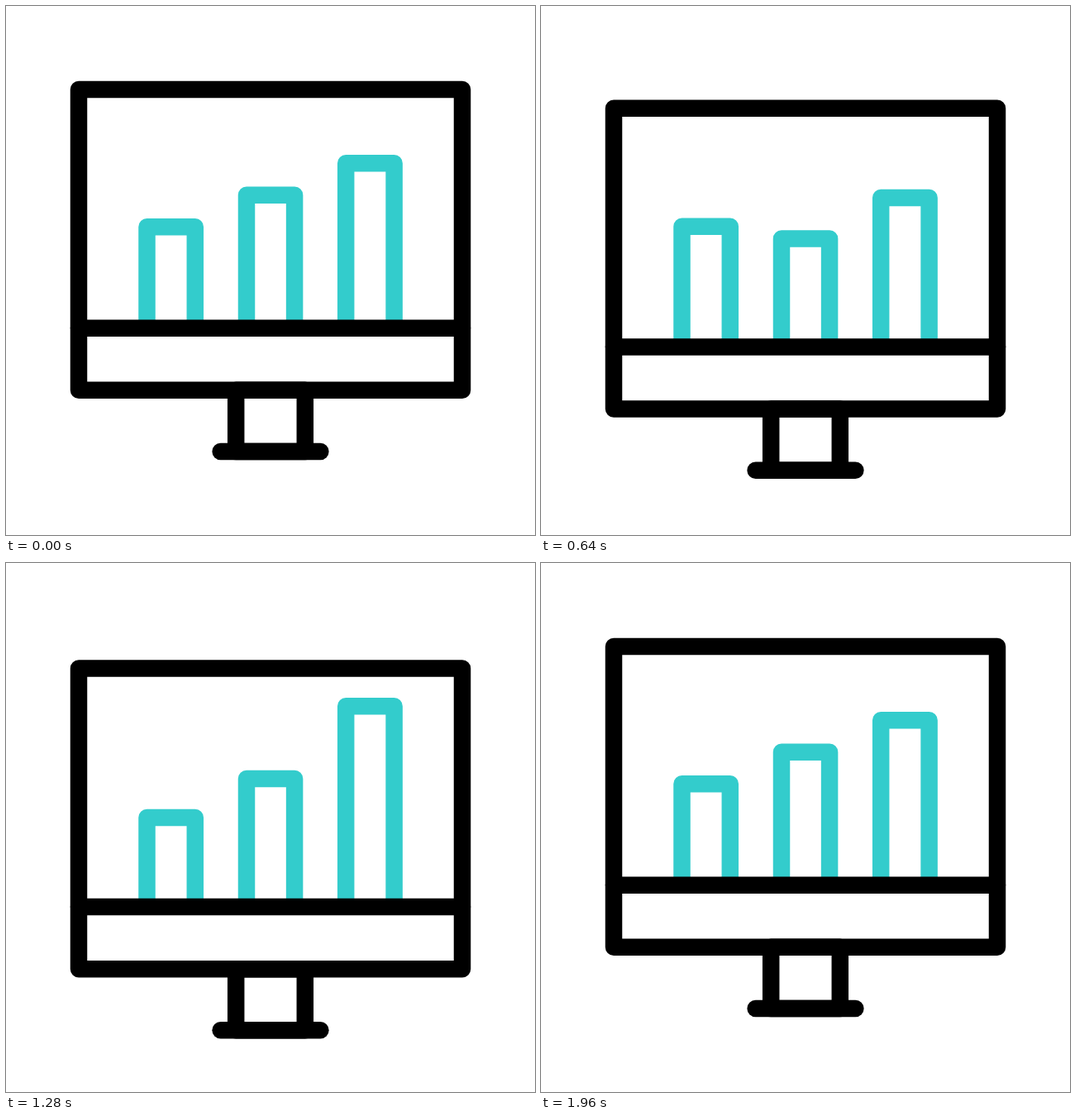
Recreate the animation shown at these times as an HTML page with a canvas. Size 640 by 640 pixels, loop 2000 ms.

```html
<!DOCTYPE html>
<html lang="en">
<head>
<meta charset="utf-8">
<title>Bar chart on a monitor</title>
<style>
  html, body { margin: 0; width: 100%; height: 100%; overflow: hidden; background: #fff; }
  canvas { display: block; width: 640px; height: 640px; }
</style>
</head>
<body>
<canvas id="stage" width="640" height="640"></canvas>
<script>
const ctx = document.getElementById('stage').getContext('2d');
const LOOP = 2000, STEP = 40, STAGGER = 200;
const BAND_Y = 389.7;

// [time in ms, vertical offset]
const bob = [[40, 0], [1000, 31], [1960, 0]];
const bounce = [[40, 0], [400, 31], [800, -47.4], [1200, 16], [1520, 0]];

// [left, right, resting top], measured along the centre of the stroke
const bars = [[170.5, 228.8, 267.3], [291, 349.1, 228.8], [411.2, 469.6, 190.3]];

// cubic-bezier(.5, 0, .5, 1)
function ease(x) {
  let lo = 0, hi = 1;
  for (let i = 0; i < 30; i++) {
    const u = (lo + hi) / 2, v = 1 - u;
    if (1.5 * u * v * v + 1.5 * u * u * v + u * u * u < x) lo = u;
    else hi = u;
  }
  return lo * lo * (3 - 2 * lo);
}

function valueAt(keys, t) {
  if (t <= keys[0][0]) return keys[0][1];
  for (let i = 1; i < keys.length; i++) {
    const [t0, v0] = keys[i - 1], [t1, v1] = keys[i];
    if (t < t1) return v0 + (v1 - v0) * ease((t - t0) / (t1 - t0));
  }
  return keys[keys.length - 1][1];
}

function line(...points) {
  ctx.beginPath();
  points.forEach(([x, y]) => ctx.lineTo(x, y));
  ctx.stroke();
}

function box(x0, y0, x1, y1) {
  ctx.strokeRect(x0, y0, x1 - x0, y1 - y0);
}

function draw(t) {
  ctx.setTransform(1, 0, 0, 1, 0, 0);
  ctx.fillStyle = '#fff';
  ctx.fillRect(0, 0, 640, 640);
  ctx.translate(0, valueAt(bob, t));
  ctx.lineWidth = 20.5;
  ctx.lineJoin = 'round';

  ctx.strokeStyle = '#33cccc';
  ctx.lineCap = 'butt';
  bars.forEach(([x0, x1, top], i) => {
    const y = top + valueAt(bounce, t - i * STAGGER);
    line([x0, BAND_Y], [x0, y], [x1, y], [x1, BAND_Y]);
  });

  ctx.strokeStyle = '#000';
  ctx.lineCap = 'round';
  box(88, 101.1, 552, 464.8);
  line([88, BAND_Y], [552, BAND_Y]);
  box(278.2, 464.8, 361.8, 538.9);
  line([259.6, 538.9], [380.4, 538.9]);
}

function tick() {
  const t = performance.now() % LOOP;
  draw(Math.floor(t / STEP) * STEP);
  requestAnimationFrame(tick);
}
tick();
</script>
</body>
</html>
```
